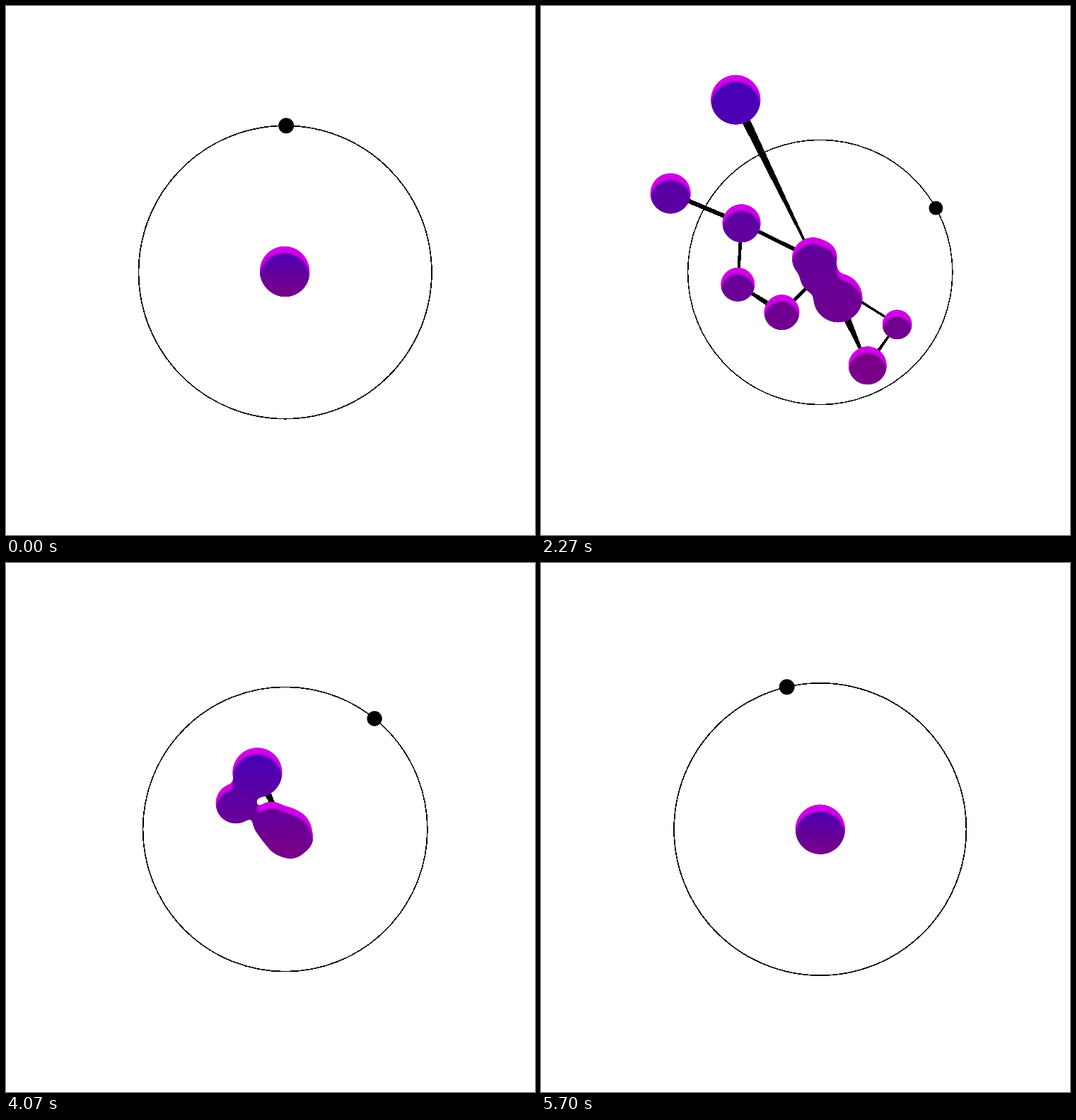
These frames come from a looping animation (748 px wide and 748 px high, 5.73 s). An HTML page:

```html
<!DOCTYPE html>
<html lang="en">
<head>
<meta charset="utf-8">
<title>Gooey molecule</title>
<style>
  html, body { margin: 0; width: 100%; height: 100%; overflow: hidden; background: #fff; }
  svg { display: block; width: 100vw; height: 100vh; }
  #ring, #bonds { shape-rendering: crispEdges; }
</style>
</head>
<body>
<svg viewBox="0 0 748 748">
  <defs>
    <linearGradient id="tint" gradientUnits="userSpaceOnUse" x1="0" x2="0">
      <stop offset="0" stop-color="#4600b9"/>
      <stop offset="1" stop-color="#7b0086"/>
    </linearGradient>
    <filter id="goo" filterUnits="userSpaceOnUse" x="-395" y="-377" width="748" height="748"
            color-interpolation-filters="sRGB">
      <feGaussianBlur in="SourceGraphic" stdDeviation="5"/>
      <feColorMatrix values="1 0 0 0 0  0 1 0 0 0  0 0 1 0 0  0 0 0 18 -7.8" result="body"/>
      <feOffset in="body" dy="9.5"/>
      <feGaussianBlur stdDeviation="1" result="lowered"/>
      <feFlood flood-color="#d000e6"/>
      <feComposite in2="body" operator="in" result="rim"/>
      <feComposite in="body" in2="lowered" operator="in" result="face"/>
      <feMerge>
        <feMergeNode in="rim"/>
        <feMergeNode in="face"/>
      </feMerge>
    </filter>
  </defs>
  <g transform="translate(394.75 376.5)">
    <circle id="ring" fill="none" stroke="#000"/>
    <circle id="dot"/>
    <path id="bonds"/>
    <g id="atoms" filter="url(#goo)" fill="url(#tint)"></g>
  </g>
</svg>
<script>
const LOOP = 5730;
const $ = id => document.getElementById(id);
const setAll = (el, attrs) => { for (const k in attrs) el.setAttribute(k, attrs[k]); };

// x, y, radius, delay in steps, extra hold in seconds
const STEP = 0.042;
const atoms = {
  A: [-129, -263.5, 35, 0],
  B: [-74, -143, 29.5, 4, STEP],
  C: [-228.5, -120.5, 28.5, 0],
  D: [-128.7, -80.2, 27, 1],
  E: [-0.5, -76, 24, 3],
  F: [-8.7, 32.7, 27.5, 4],
  G: [-160.5, 23.9, 24, 2],
  H: [-74.8, 78, 25, 2],
  I: [126, 85.4, 21, 1],
  J: [92.4, 181.7, 27, 2],
  K: [181.5, 261, 34.5, 4]
};

// two atoms and the bond width at each end
const bonds = [
  ["AB", 13.5, 2], ["BD", 6, 5], ["CD", 6.5, 6], ["DG", 5, 4],
  ["GH", 4, 8], ["HF", 6, 4.5], ["FE", 5.5, 7], ["EB", 5, 8],
  ["FI", 4.5, 3], ["IJ", 2, 6], ["JK", 2, 13.5]
];

const nodes = {};
for (const id in atoms) {
  const c = document.createElementNS("http://www.w3.org/2000/svg", "circle");
  c.setAttribute("r", atoms[id][2]);
  nodes[id] = $("atoms").appendChild(c);
}

// cubic-bezier(x1, 0, x2, 1)
function bezier(x1, x2) {
  return x => {
    if (x <= 0) return 0;
    if (x >= 1) return 1;
    let lo = 0, hi = 1;
    for (let i = 0; i < 24; i++) {
      const s = (lo + hi) / 2, r = 1 - s;
      if (3 * r * r * s * x1 + 3 * r * s * s * x2 + s * s * s < x) lo = s;
      else hi = s;
    }
    return lo * lo * (3 - 2 * lo);
  };
}
const spread = bezier(0.9, 0.1);
const shrink = bezier(0.68, 0.25);

// The clock ticks five times per 200 ms, unevenly; returns seconds in a 2 s cycle.
function cycleTime(ms) {
  const part = ms % 200;
  const tick = 5 * Math.floor(ms / 200) + [70, 100, 130, 170].filter(m => part >= m).length;
  return (7.51 * tick + 0.4) / 180 % 2;
}

function reach(time, delay, hold = 0) {
  const q = (time - delay * STEP + 2.067) % 2;
  return q < 0.6 ? spread(q / 0.6) : 1 - spread((q - 0.62 - hold) / 1.3);
}

function bondPath(a, b, wa, wb) {
  const dx = b[0] - a[0], dy = b[1] - a[1];
  const len = Math.hypot(dx, dy);
  if (len < 0.5) return "";
  const nx = -dy / len / 2, ny = dx / len / 2;
  const at = (p, w) => (p[0] + nx * w).toFixed(2) + " " + (p[1] + ny * w).toFixed(2);
  return `M${at(a, wa)}L${at(b, wb)}L${at(b, -wb)}L${at(a, -wa)}Z`;
}

function draw(ms) {
  const time = cycleTime(ms);

  const radius = 207.2 - 127.2 * shrink(time < 1 ? time : 2 - time);
  const angle = time * Math.PI;
  setAll($("ring"), { r: radius, "stroke-width": radius * 0.0082 });
  setAll($("dot"), {
    cx: radius * Math.sin(angle),
    cy: -radius * Math.cos(angle),
    r: radius * 0.053
  });

  const pos = {};
  let top = Infinity, bottom = -Infinity;
  for (const id in atoms) {
    const [x, y, r, delay, hold] = atoms[id];
    const k = reach(time, delay, hold);
    pos[id] = [x * k, y * k];
    setAll(nodes[id], { cx: x * k, cy: y * k });
    top = Math.min(top, y * k - r);
    bottom = Math.max(bottom, y * k + r);
  }
  setAll($("tint"), { y1: top, y2: bottom });
  $("bonds").setAttribute("d",
    bonds.map(([ends, wa, wb]) => bondPath(pos[ends[0]], pos[ends[1]], wa, wb)).join(""));
}

const start = performance.now();
function frame() {
  draw((performance.now() - start) % LOOP);
  requestAnimationFrame(frame);
}
frame();
</script>
</body>
</html>
```
